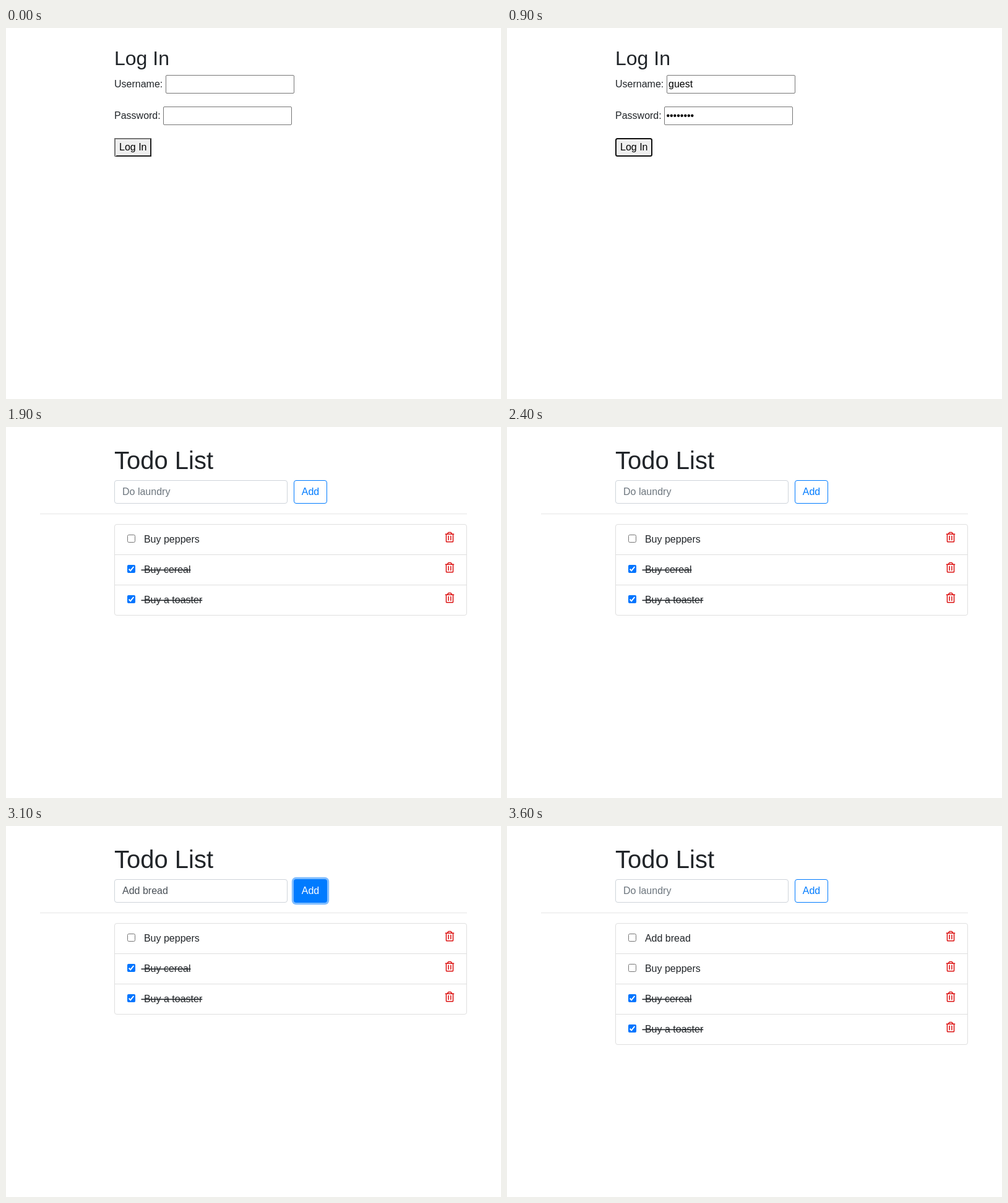
Animation of 800x600 px, one loop 4 s. Source, as an HTML page:

```html
<!DOCTYPE html>
<html lang="en">
<head>
<meta charset="utf-8">
<title>Todo List</title>
<style>
  html, body { margin: 0; width: 100%; height: 100%; overflow: hidden; background: #fff; }
  svg { display: block; }
  text { font: 16px "Liberation Sans", Arial, sans-serif; fill: #212529; white-space: pre; }
  .h1 { font-size: 40px; }
  .h2 { font-size: 32px; }
  .dark { fill: #000; }
  .blue { fill: #007bff; }
  .white { fill: #fff; }
  .done { text-decoration: line-through; }
  .box { fill: #fff; stroke: #767676; }
  .line { fill: none; stroke: #dfdfdf; }
  .trash { fill: none; stroke: #dc1414; stroke-width: 1.45; stroke-linecap: round; stroke-linejoin: round; }
</style>
</head>
<body>
<svg width="800" height="600" viewBox="0 0 800 600">
  <defs>
    <g id="bin" class="trash" transform="translate(709.65 169.8) scale(1.05)">
      <path d="M.7 3.25H13.3M3.6 3L4.8 1.1Q5 .75 5.5 .75H8.5Q9 .75 9.2 1.1L10.4 3"/>
      <path d="M1.75 3.5V14.5Q1.75 15.25 2.5 15.25H11.5Q12.25 15.25 12.25 14.5V3.5"/>
      <path d="M5.25 6.2V12.3M8.75 6.2V12.3"/>
    </g>
  </defs>

  <g id="login">
    <text class="h2" x="175" y="60">Log In</text>
    <text x="175" y="96">Username:</text>
    <rect class="box" x="258.5" y="76.5" width="207" height="29" rx="1.5"/>
    <rect id="userFocus" x="259" y="77" width="206" height="28" rx="2" fill="none" stroke="#101010" stroke-width="2"/>
    <text id="user" class="dark" x="261" y="96">guest</text>
    <text x="175" y="147">Password:</text>
    <rect class="box" x="254.5" y="127.5" width="207" height="29" rx="1.5"/>
    <text id="pass" class="dark" x="257.4" y="147">••••••••</text>
    <g id="submitIdle">
      <path fill="#212121" d="M175 208H235V178Z"/>
      <path fill="#767676" d="M175 208V178H235L233 180H177V206Z"/>
      <path fill="#efefef" d="M177 180H233V206H177Z"/>
    </g>
    <rect id="submitFocus" x="176" y="179" width="58" height="28" rx="2.5" fill="#efefef" stroke="#101010" stroke-width="2"/>
    <text class="dark" x="183" y="198">Log In</text>
  </g>

  <g id="todo">
    <text class="h1" x="175" y="68">Todo List</text>
    <rect id="entryFocus" x="173.4" y="84.4" width="283.2" height="41.2" rx="5.6" fill="none" stroke="#bfdeff" stroke-width="3.2"/>
    <rect x="175.5" y="86.5" width="279" height="37" rx="3.5" fill="#fff" stroke="#ced4da"/>
    <text id="entry" x="188" y="110"></text>
    <rect x="465.5" y="86.5" width="53" height="37" rx="3.5" fill="#fff" stroke="#007bff"/>
    <text class="blue" x="477.8" y="110">Add</text>
    <g id="addActive">
      <rect x="461.8" y="82.8" width="60.4" height="44.4" rx="7" fill="#80bdff"/>
      <rect x="465" y="86" width="54" height="38" rx="4" fill="#007bff"/>
      <text class="white" x="477.8" y="110">Add</text>
    </g>
    <path class="line" style="stroke:#e5e5e5" d="M55 140.5H745"/>
    <g id="list"></g>
  </g>
</svg>
<script>
const LOOP = 4000, STEP = 100, ROW = 49;
const el = id => document.getElementById(id);
const show = (id, on) => el(id).setAttribute("visibility", on ? "inherit" : "hidden");
const fade = (id, amount) => el(id).setAttribute("opacity", amount);
const ease = (t, start, length) => {
  const p = Math.min(1, Math.max(0, (t - start) / length));
  return p * p * (3 - 2 * p);
};

const items = [
  { label: "Buy peppers" },
  { label: "Buy cereal", done: true },
  { label: "Buy a toaster", done: true }
];

function checkbox(done) {
  return done
    ? `<rect x="196" y="174" width="13" height="13" rx="2" fill="#0075ff"/>
       <path d="M198.6 180.8L201.2 183.4L206.3 177" fill="none" stroke="#fff" stroke-width="2"/>`
    : `<rect class="box" x="196.5" y="174.5" width="12" height="12" rx="2"/>`;
}

function row({ label, done }, i, icons) {
  return `<g transform="translate(0 ${i * ROW})">
    ${i ? '<path class="line" d="M176 157.5H744"/>' : ""}
    ${checkbox(done)}
    <text class="${done ? "done" : ""}" x="218.5" y="187">\u00a0${label}</text>
    ${icons ? '<use href="#bin"/>' : ""}
  </g>`;
}

let listState = "";
function drawList(added, icons) {
  const state = `${added}/${icons}`;
  if (state === listState) return;
  listState = state;
  const rows = added ? [{ label: "Add bread" }, ...items] : items;
  el("list").innerHTML =
    `<rect class="line" x="175.5" y="157.5" width="569" height="${rows.length * ROW}" rx="3.5"/>` +
    rows.map((item, i) => row(item, i, icons)).join("");
}

function render(t) {
  show("login", t < 1700);
  show("user", t >= 800);
  show("userFocus", t >= 800 && t < 900);
  show("pass", t >= 900);
  show("submitIdle", t < 900);
  show("submitFocus", t >= 900);

  const added = t >= 3300;
  const typed = t >= 2800 && !added;
  show("todo", t >= 1800 && !(t >= 3200 && t < 3300));
  el("entry").textContent = typed ? "Add bread" : "Do laundry";
  el("entry").style.fill = typed ? "#495057" : "#6c757d";
  fade("entryFocus", typed ? 1 - ease(t, 2750, 250) : 0);
  fade("addActive", typed ? ease(t, 2850, 150) : 0);
  drawList(added, added ? t >= 3400 : t >= 1900);
}

const begin = performance.now();
function tick() {
  const t = (performance.now() - begin) % LOOP;
  render(Math.floor(t / STEP) * STEP);
  requestAnimationFrame(tick);
}
tick();
</script>
</body>
</html>
```
